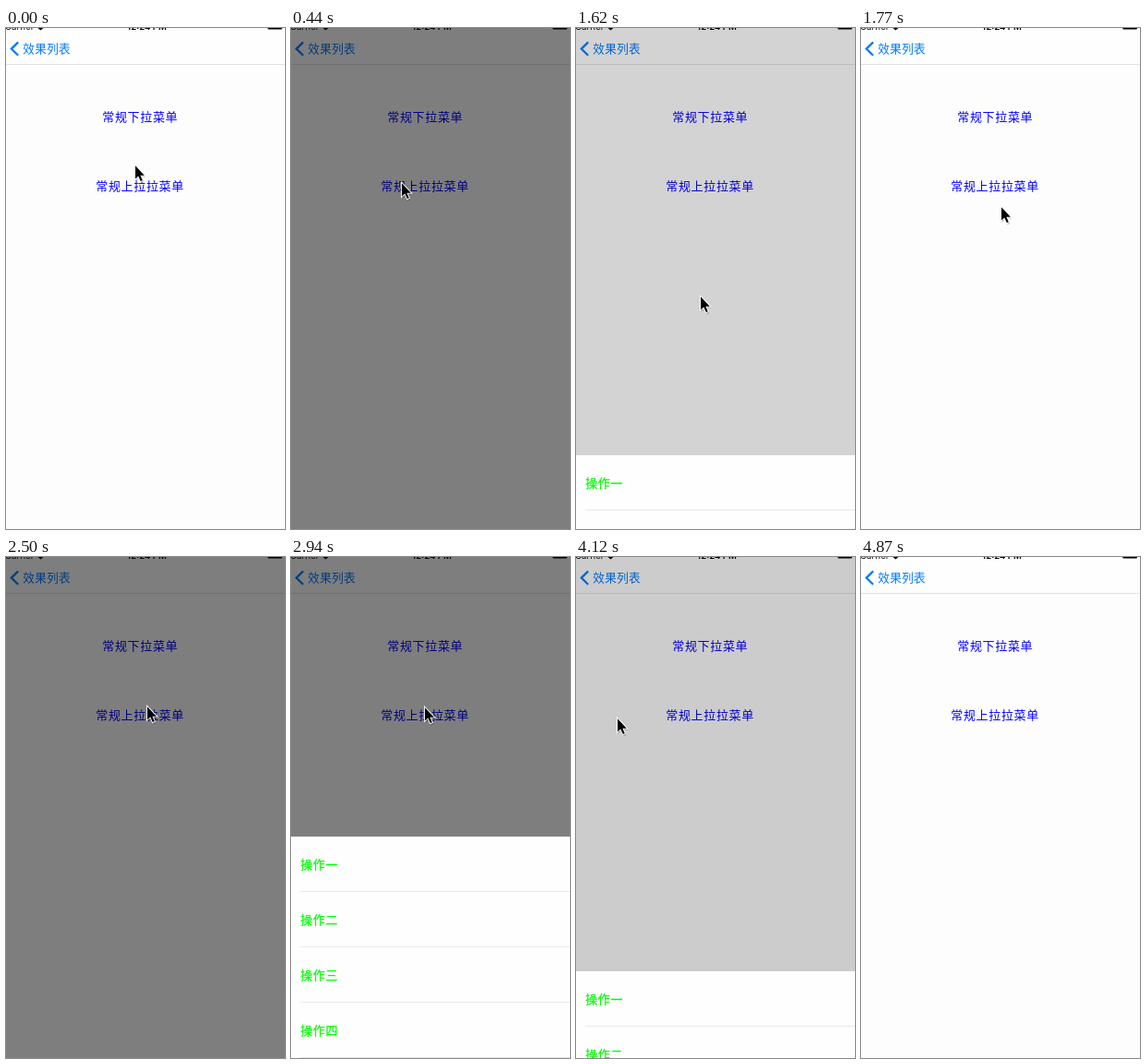
An HTML page for the animation above (5.32 s loop, 302x543 px).

```html
<!DOCTYPE html>
<html lang="zh-CN">
<head>
<meta charset="utf-8">
<title>Menu</title>
<style>
html, body { margin: 0; width: 100%; height: 100%; overflow: hidden; background: #fdfdfd; }
svg { display: block; width: 302px; height: 543px; }
text { font-family: "Noto Sans CJK SC", "Noto Sans CJK", sans-serif; font-size: 13px; letter-spacing: .05em; }
.bar { font-family: Inter, "Liberation Sans", sans-serif; font-size: 9.6px; letter-spacing: 0; }
.nav { font-size: 12.6px; letter-spacing: .03em; fill: #007aff; }
.link { fill: #00f; font-weight: 300; }
.item { fill: #0f0; font-weight: 500; stroke: #0f0; stroke-width: .25; }
</style>
</head>
<body>
<svg viewBox="0 0 302 543">
  <rect width="302" height="543" fill="#fdfdfd"/>
  <rect width="302" height="39" fill="#fefefe"/>
  <rect y="39" width="302" height="1" fill="#e2e2e2"/>
  <text class="bar" x="-1" y="2">Carrier</text>
  <path d="M34.5 0H40.5L37.5 2.4Z"/>
  <text class="bar" x="152.5" y="2" text-anchor="middle" font-weight="600">12:24 PM</text>
  <rect x="283.3" y="-4" width="15.6" height="5.6" rx="1"/>
  <path d="M13.2 15.4L5.8 22.6L13.2 29.8" fill="none" stroke="#007aff" stroke-width="2.2"/>
  <text class="nav" x="18.2" y="27">效果列表</text>
  <text class="link" x="104.3" y="100.8">常规下拉菜单</text>
  <text class="link" x="97.3" y="175.8">常规上拉拉菜单</text>
  <rect id="dim" width="302" height="543" opacity="0"/>
  <g id="menu"></g>
  <g id="cursor">
    <path d="M.8 1.6V17L4.6 14L7 19.4L9.8 18.4L7.3 12.8H12Z" opacity=".22" transform="translate(.5 .8)"/>
    <path d="M1 1.2V15.4L4.3 12.4L6.8 18.1L8.8 17.2L6.4 11.7H10.8Z" stroke="#fff" stroke-width="1.8" paint-order="stroke"/>
  </g>
</svg>
<script>
const LOOP = 5320, BEAT = 147.6, LEAD = 10;   // ms
const TOP = 303, ROW = 60, ROWS = [..."一二三四"];
const SLIDE = 2.04;                           // beats

// All times below are in beats.
const visits = [{ open: 3, close: 9.75 }, { open: 17, close: 25.83 }];

// Pointer stops: time of arrival, time of departure, tip
const stops = [
  { from: 0, to: 0, x: 139, y: 148 },
  { from: 2, to: 4, x: 119, y: 167 },
  { from: 9, to: 10, x: 116, y: 386 },
  { from: 12, to: 12, x: 151, y: 193 },
  { from: 16, to: 18, x: 152, y: 161 },
  { from: 24, to: 27, x: 44, y: 174 },
  { from: 33, to: 99, x: 244, y: 560 }
];

const $ = id => document.getElementById(id);
const dim = $("dim"), menu = $("menu"), cursor = $("cursor");

menu.innerHTML = `<rect width="302" height="${ROW * ROWS.length}" fill="#fefefe"/>` +
  ROWS.map((n, i) =>
    `<text class="item" x="10.2" y="${i * ROW + 34.8}">操作${n}</text>` +
    `<rect x="10" y="${(i + 1) * ROW - 1}" width="292" height="1" fill="#e8e8e8"/>`
  ).join("");

function ease(u) {
  u = Math.min(1, Math.max(0, u));
  return u * u * (3 - 2 * u);
}

const mix = (a, b, k) => Math.round(a + (b - a) * k);
const move = (el, x, y) => el.setAttribute("transform", `translate(${x} ${y})`);

function drawMenu(b) {
  let shade = 0, rise = 0;
  for (const { open, close } of visits) {
    if (b < open || b >= close + SLIDE) continue;
    const left = 1 - ease((b - close) / SLIDE);
    shade = 0.5 * left;
    rise = ease((b - open) / SLIDE) * left;
  }
  dim.setAttribute("opacity", shade);
  move(menu, 0, mix(TOP + ROW * ROWS.length, TOP, rise));
}

function drawCursor(b) {
  const i = stops.findIndex(s => b <= s.to);
  const next = stops[i], prev = stops[i - 1] || next;
  const k = ease((b - prev.to) / (next.from - prev.to || 1));
  move(cursor, mix(prev.x, next.x, k), mix(prev.y, next.y, k));
}

function draw(t) {
  const beat = Math.floor((t + LEAD) / BEAT);
  drawMenu(beat);
  drawCursor(beat);
}

const start = performance.now();
function frame() {
  draw((performance.now() - start) % LOOP);
  requestAnimationFrame(frame);
}
draw(0);
requestAnimationFrame(frame);
</script>
</body>
</html>
```
